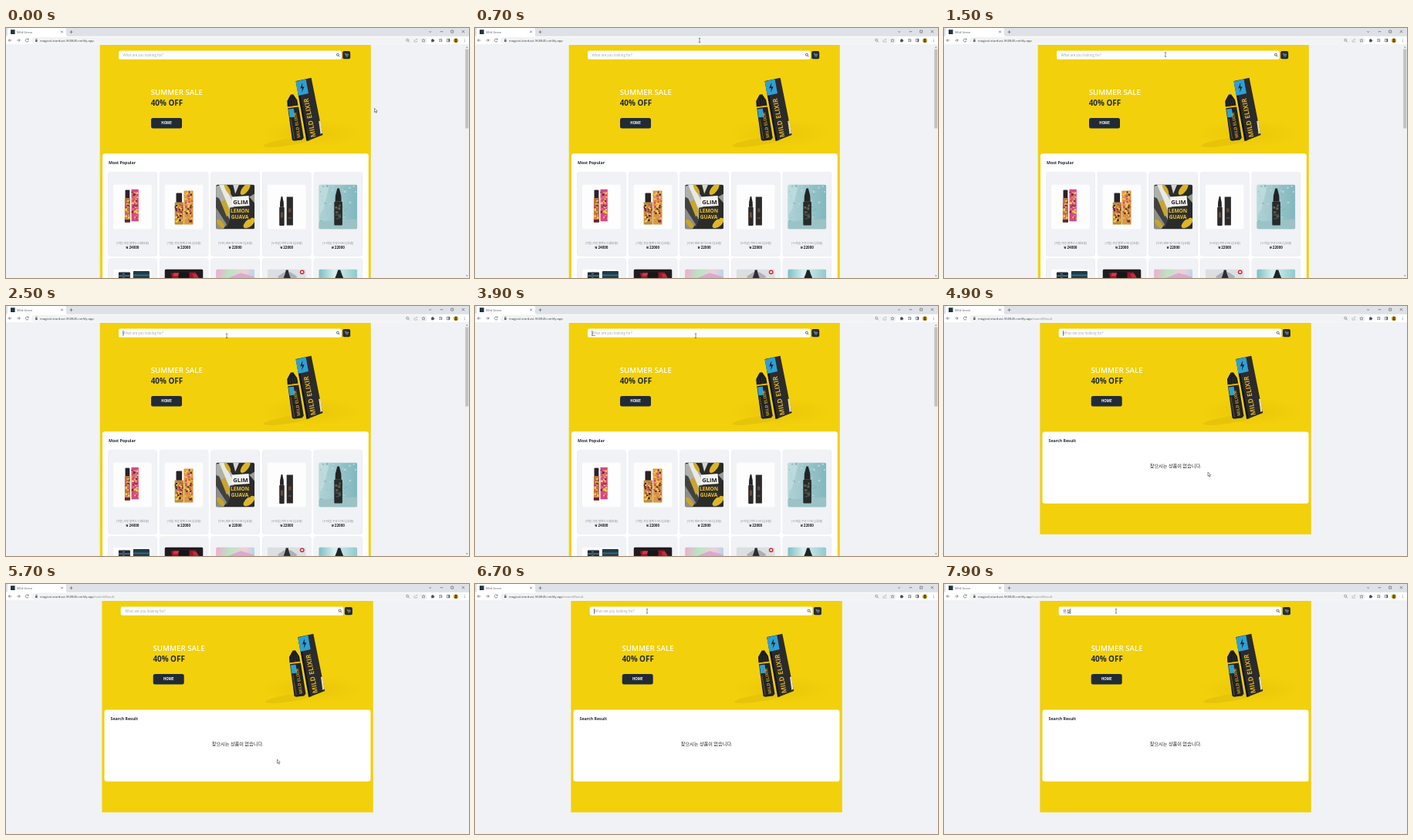
An HTML page for the animation above (8000 ms loop, 600 px wide and 325 px high).

```html
<!DOCTYPE html>
<html lang="en">
<head>
<meta charset="utf-8">
<title>Shop search</title>
<style>
html, body { margin: 0; width: 100%; height: 100%; overflow: hidden; background: #f0f2f5; }
svg { display: block; }
#stage { width: 600px; height: 325px; }
text { font-family: 'Open Sans', 'Noto Sans CJK KR', 'Noto Sans', sans-serif; white-space: pre; }
.ko { font-family: 'Noto Sans CJK KR', 'Noto Sans CJK', sans-serif; }
.line { fill: none; stroke: #55595e; stroke-width: .65; }
</style>
</head>
<body>
<svg id="stage" viewBox="0 0 600 325"></svg>
<script>
const YELLOW = '#f2d00b', DARK = '#212b36', GREY = '#f0f2f5', BLACK = '#1d1e22';
const LOOP = 8000, STEP = 100, SWITCH = 4000;

const rect = (x, y, w, h, fill, r = 0) =>
  `<rect x="${x}" y="${y}" width="${w}" height="${h}" rx="${r}" fill="${fill}"/>`;
const poly = (points, fill) => `<polygon points="${points}" fill="${fill}"/>`;
const dot = (x, y, r, fill) => `<circle cx="${x}" cy="${y}" r="${r}" fill="${fill}"/>`;
const oval = (x, y, rx, ry, turn, fill) =>
  `<ellipse cx="${x}" cy="${y}" rx="${rx}" ry="${ry}" transform="rotate(${turn} ${x} ${y})" fill="${fill}"/>`;
const line = (d, extra = '') => `<path class="line" d="${d}" ${extra}/>`;
const text = (x, y, size, str, fill = DARK, extra = '') =>
  `<text x="${x}" y="${y}" font-size="${size}" fill="${fill}" ${extra}>${str}</text>`;
const group = (x, y, body, extra = '') => `<g transform="translate(${x} ${y})" ${extra}>${body}</g>`;
const turned = (x, y, angle, body) => `<g transform="translate(${x} ${y}) rotate(${angle})">${body}</g>`;
const BOLD = 'font-weight="700"', MID = 'text-anchor="middle"';

let seed = 7;
const random = () => (seed = seed * 16807 % 2147483647) / 2147483647;

function speckle(x, y, w, h, colors, count) {
  let out = '';
  for (let i = 0; i < count; i++) {
    const size = 1 + random() * 1.8;
    out += rect((x + random() * (w - size)).toFixed(1), (y + random() * (h - size)).toFixed(1),
      size.toFixed(1), size.toFixed(1), colors[i % colors.length], .5);
  }
  return out;
}

// Browser window
function magnifier(x, y, color) {
  return line(`M${x + .8} ${y + .8}l1.6 1.6`, `style="stroke:${color}"`) +
    `<circle class="line" cx="${x - .3}" cy="${y - .3}" r="1.5" style="stroke:${color}"/>`;
}

function browser() {
  return rect(0, 0, 600, 11, '#dee1e6') +
    '<path d="M0 11Q2 11 2 9V2Q2 0 4 0H76Q78 0 78 2V9Q78 11 80 11Z" fill="#fff"/>' +
    rect(0, 10.8, 600, 11.2, '#fff') + rect(0, 21.6, 600, .4, '#dfe1e5') +
    rect(6, 2.2, 5.6, 5.8, '#23343c') +
    text(14, 6.8, 4, 'Mild Grove', '#5a5e63') +
    line('M71.2 3.7l2.6 2.6m0-2.6l-2.6 2.6M84.5 3.2v4M82.5 5.2h4') +
    line('M548.2 4.2l1.5 1.4 1.5-1.4M562.7 4.7h3.6M576.7 3.1h3v3h-3zM590.8 2.9l3.4 3.4m0-3.4l-3.4 3.4') +
    line('M7.3 16H3.3m1.9-1.9l-1.9 1.9 1.9 1.9M14.3 16h4m-1.9-1.9l1.9 1.9-1.9 1.9M29 14.9a2 2 0 1 0 .2 1.8M29.2 13.6v1.5h-1.5') +
    rect(33, 11.8, 513, 9, '#f1f3f4', 4.5) +
    rect(38, 15.5, 2.7, 2.4, '#5f6368', .4) + line('M38.6 15.5v-.6a.8.8 0 0 1 1.6 0v.6') +
    magnifier(520.5, 16, '#6f7378') +
    line('M529 15.3v2.8h3.6v-1.4M530.2 16.4q.3-1.8 2.6-1.8m-.8-.8l.8.8-.8.8', 'opacity=".45"') +
    line('M541 14l.7 1.4 1.5.2-1.1 1 .3 1.6-1.4-.8-1.4.8.3-1.6-1.1-1 1.5-.2z', 'opacity=".8"') +
    rect(551.2, 14.8, 3.2, 3.4, '#4b4f54', .5) + dot(552.9, 14.6, .7, '#4b4f54') + dot(554.6, 16.5, .7, '#4b4f54') +
    line('M561.2 14.6h3.6M561.2 16h2.3M561.2 17.4h1.8M564.8 14.6v2.6') + dot(564.3, 17.2, .7, '#4b4f54') +
    line('M571.4 14.3h3.5v3.5h-3.5z') + rect(573.4, 14.3, 1.6, 3.5, '#4b4f54') +
    dot(583, 16.2, 3, '#c99a1c') + dot(583, 15.2, 1.2, '#4d3820') + rect(581.4, 16.6, 3.2, 1.9, '#4d3820', .9) +
    [14.6, 16.2, 17.8].map(y => dot(594.3, y, .45, '#4b4f54')).join('');
}

// Top banner, shared by both pages
function hero() {
  const label = (size, color) => text(0, 0, size, 'MILD ELIXIR', color, BOLD);
  const box = poly('375.5,69 379,68.4 393.5,146 389.5,147', '#121316') +
    poly('378,68.6 395.6,64.8 410.5,139 392,146.3', '#2b2b2c') +
    poly('375.5,69.4 388.6,66.4 392,85 378.8,88', '#2f9fd4') +
    poly('384.3,71 381.2,78.6 384,78 383.2,84 386.6,76 384,76.6', '#15212b') +
    poly('405.3,121 407.3,120.4 410,136.5 407.6,138', '#e7dcb0') +
    turned(401.4, 141.6, -100.8, label(8.7, '#dcae22'));
  const bottle = poly('364.8,102.5 364.3,95 367.6,88.8 369,86.6 372.3,86.2 373.6,88.2 377.2,93.6 378.6,101', '#1c1d20') +
    line('M367.6 93l1.2 8.5M371 92l1.3 9M374.2 92.4l1.2 8', 'style="stroke:#3b3c3e;stroke-width:.6"') +
    poly('365,102.4 378.8,100.6 379.2,102.8 365.3,104.4', '#e5b313') +
    poly('365.3,104.2 379.2,102.6 385.8,142.8 383.5,145.6 373,146.8 370.8,145.4', '#222326') +
    poly('366,105.6 372.8,104.8 374.6,115.6 367.6,116.6', '#2f9fd4') +
    turned(381.6, 142.4, -99.5, label(5.6, '#c99c22')) +
    '<path d="M373.6 144l-4.6-26" stroke="#9a7b24" stroke-width=".9" stroke-dasharray="1.2 .7"/>';
  return oval(395, 137, 66, 18, 0, 'url(#glow)') + oval(367, 148, 34, 4.5, -9, '#e6c40a') + box + bottle +
    rect(146, 29.5, 288.6, 11.3, '#fff', 2) + magnifier(430.2, 35, '#222') +
    rect(436.2, 30, 10, 10.3, DARK, 2) +
    line('M439 33.3h.9l.7 2.7h2.4l.5-1.9h-3.3', 'style="stroke:#e8eaec;stroke-width:.5"') +
    dot(441, 37.2, .4, '#e8eaec') + dot(442.7, 37.2, .4, '#e8eaec') +
    text(187.7, 87.4, 9.75, 'SUMMER SALE', '#fffdf0', 'font-weight="600"') +
    text(187.7, 100.7, 9.9, '40% OFF', DARK, BOLD) +
    rect(188, 117, 40, 13.4, DARK, 2.5) +
    text(208, 125.4, 4.4, 'HOME', '#fff', `${BOLD} ${MID}`);
}

// Product pictures, each 50 by 58
const paper = rect(0, 0, 50, 58, '#fdfdfd');
const funky = ['#efcf45', '#d8457f', '#efcf45', '#6b2b40', '#dd8540'];
const dropper = (x, y, w, h, fill) => {
  const cx = x + w / 2, neck = y + h * .36;
  return poly(`${cx - w * .12},${y} ${cx + w * .12},${y} ${x + w * .85},${y + h * .2} ` +
    `${x + w * .88},${neck} ${x + w * .12},${neck} ${x + w * .15},${y + h * .2}`, '#232224') +
    rect(x, neck, w, y + h - neck, fill, 1);
};
const pictures = [
  paper + rect(15.6, 7, 5.8, 12, '#28222a', 1) + rect(15, 17.5, 7, 32, '#b9743f', .8) +
    speckle(15, 19, 7, 28, funky, 40) + rect(15, 45.5, 7, 3.5, '#5a2834') +
    rect(23.6, 6.2, 9.3, 41.6, '#d8478a') + speckle(23.6, 9, 9.3, 36, funky, 60),
  paper + rect(15, 11, 7.6, 13, '#28232a', 1) + rect(13.2, 23, 11.2, 29, '#bd8a3a', .8) +
    speckle(13.2, 25, 11.2, 26, [...funky, '#39252d'], 65) +
    rect(25, 8, 12, 44, '#d69a45') + speckle(25, 8.5, 12, 43, funky, 85),
  rect(0, 0, 50, 58, '#2a2b2b') + poly('0,2 12,0 25,22 17,47 0,20', '#aeb0aa') +
    poly('4,0 10,0 23,25 18,33', '#e9e9e4') + poly('0,16 4,18 18,46 14,56 0,34', '#414240') +
    poly('0,30 14,52 9,58 0,58', '#8d8e88') + poly('6,22 12,20 18,36 14,42', '#c9a52b') +
    poly('22,0 30,0 25,12', '#d5d6d0') + poly('50,12 50,24 43,16', '#9b9c94') +
    oval(38, 6, 4, 9, 38, '#dcb526') + oval(15, 6, 2.5, 7, -30, '#d2ab23') +
    oval(43, 50, 9, 4.5, -40, '#ddb629') + oval(6, 51, 7, 3, 50, '#c9a427') +
    poly('20.5,16 42.5,14.5 43.5,27.5 21,29', '#f4f4f1') + poly('18,30 43,28.5 45,45 18,46', '#33312a') +
    text(31.8, 25.2, 7.6, 'GLIM', '#202123', `${BOLD} ${MID}`) +
    text(31, 36.6, 6.6, 'LEMON', '#e9c338', `${BOLD} ${MID}`) +
    text(31, 44.2, 6.6, 'GUAVA', '#e9c338', `${BOLD} ${MID}`),
  paper + dropper(15.5, 15.5, 6.5, 38, '#2c292a') + rect(25, 16, 8.2, 37, '#2d2a2b') +
    rect(17.5, 36, 2.6, 7, '#6a5140') + rect(27.4, 31, 3.3, 5, '#5f4a3d') + rect(27, 43, 4.2, 1, '#7b604b'),
  rect(0, 0, 50, 58, 'url(#water)') + poly('0,0 14,0 6,32 0,40', '#bddadc') +
    speckle(0, 0, 50, 58, ['#a5cdd0', '#86b8be', '#b4d6d8'], 70) +
    poly('0,48 50,45 50,58 0,58', '#9bc3c6') + dropper(20, 5, 10.6, 48, '#272a2b') +
    speckle(21, 26, 8.6, 22, ['#6f6148', '#3e4748'], 22),
  paper + rect(7, 4, 15, 54, '#1b2b36', 1) + rect(26, 2.5, 21, 56, '#1f3b4a', 1) +
    rect(7, 8, 15, 1.5, '#4b7c8d') + rect(26, 7, 21, 2, '#38697c') + rect(12, 4, 3, 54, '#3f5562'),
  rect(0, 0, 50, 58, '#1f1b1e') + poly('8,5 40,4 46,14 11,14', '#96182a') + rect(18, 4, 14, 12, '#161519', 1) +
    poly('12,5 19,5 17,9 11,9', '#d9364a') + poly('36,6 41,6 44,11 38,11', '#c62b40'),
  rect(0, 0, 50, 58, 'url(#pastel)') + poly('14,12 32,5 50,10 50,14 14,14', '#dba9cf'),
  rect(0, 0, 50, 58, '#dcdfe1') + poly('14,14 14,9 22,4 30,4 38,9 38,14', '#aab2b7') +
    poly('20,14 23,6 24,1 27,1 28,6 31,14', '#2b2e31') +
    dot(45, 3.8, 2.9, '#cc2a37') + dot(45, 3.8, 1.4, '#eee'),
  rect(0, 0, 50, 58, 'url(#mist)') + poly('20,14 23,7 25,1 28,1 30,7 33,14', '#1d2326')
];
const products = [
  ['[가람] 과일 블랙 0.3 (폐호흡)', 24000], ['[가람] 과일 블랙 0.98 (입호흡)', 22000],
  ['[다온] 레몬 향기 0.98 (입호흡)', 22000], ['[누리담] 커피 0.98 (입호흡)', 22000],
  ['[누리담] 우유 0.98 (입호흡)', 22000]
];

function card(picture, i) {
  const col = i % 5, y = i < 5 ? 186.7 : 299.3;
  const body = rect(-.2, .5, 63.4, 109.3, '#dfe2e6', 3) + rect(0, 0, 63, 109.2, GREY, 3) +
    group(6.4, i < 5 ? 16.8 : 14.2, picture, 'clip-path="url(#photo)"');
  const info = i < 5 ? text(31.5, 94.3, 3.55, products[i][0], '#85898e', `class="ko" ${MID}`) +
    text(31.5, 100.6, 4.55, '₩ ' + products[i][1], BLACK, `${BOLD} ${MID}`) : '';
  return group(132.5 + col * 66.6, y, body + info);
}

const home = rect(121.7, 22, 351.1, 303, YELLOW) + hero() +
  rect(125, 163.2, 344.8, 170, '#fff', 3) +
  text(133, 177, 5.27, 'Most Popular', DARK, BOLD) + pictures.map(card).join('') +
  rect(594.6, 22, 5.4, 303, '#f1f1f1') + rect(595.3, 27.5, 4, 103, '#c1c1c1') +
  poly('596,25.5 598.6,25.5 597.3,24', '#777') + poly('596,321.5 598.6,321.5 597.3,323', '#777');

const result = rect(124.4, 22, 351.4, 274.8, YELLOW) + group(2.7, 0, hero()) +
  rect(127.5, 163.4, 345, 93.4, '#fff', 3) +
  text(135.5, 177, 5.25, 'Search Result', DARK, BOLD) +
  text(300.3, 210.3, 6.2, '찾으시는 상품이 없습니다.', BLACK, `class="ko" font-weight="500" ${MID}`);

const stage = document.getElementById('stage');
stage.innerHTML = `<defs>
  <clipPath id="photo"><rect width="50" height="58" rx="2.5"/></clipPath>
  <radialGradient id="glow"><stop stop-color="#e9c709"/><stop offset="1" stop-color="${YELLOW}"/></radialGradient>
  <linearGradient id="water"><stop stop-color="#b0d3d6"/><stop offset="1" stop-color="#82b7be"/></linearGradient>
  <linearGradient id="mist"><stop stop-color="#79bfc3"/><stop offset=".4" stop-color="#d9eeee"/>
    <stop offset="1" stop-color="#8fcacd"/></linearGradient>
  <linearGradient id="pastel" y2=".3"><stop stop-color="#f3a9cf"/><stop offset=".35" stop-color="#b9e6c2"/>
    <stop offset=".7" stop-color="#f2cdd9"/><stop offset="1" stop-color="#a8d9ee"/></linearGradient></defs>
  ${rect(0, 0, 600, 325, GREY)}<g id="home">${home}</g><g id="result">${result}</g>${browser()}
  <text x="44" y="17.9" font-size="4.22" fill="#3c4043">magical-stardust-960845.netlify.app<tspan
    id="path" fill="#85898e">/searchResult</tspan></text>
  <g id="field">${text(0, 36.9, 4.4, 'What are you looking for?', '#a0a4a8', 'id="hint"')}
    ${text(0, 37.1, 5, '', BLACK, 'id="typed" class="ko"')}
    <path id="compose" d="M0 38.4h4.5" stroke="#333" stroke-width=".5"/>
    <path id="caret" d="M0 32v6.8" stroke="#111" stroke-width=".6"/></g>
  <path id="arrow" d="M0 0V5.2L1.2 4.1 2 6.1 2.9 5.7 2.1 3.8H3.7Z" fill="#fff" stroke="#222" stroke-width=".5"/>
  <path id="beam" d="M-1.2-2.7H1.2M0-2.7V2.7M-1.2 2.7H1.2" fill="none" stroke="#333" stroke-width=".55"/>`;

const part = id => document.getElementById(id);
const show = (id, on) => part(id).setAttribute('visibility', on ? 'visible' : 'hidden');
const move = (id, x, y) => part(id).setAttribute('transform', `translate(${x} ${y})`);

// Timelines: [time, value...]
const pointer = [[0, 477.5, 104.3], [100, 477.5, 104.3], [700, 291, 16], [1000, 291, 17.5], [1700, 286, 38.7],
  [4500, 286, 38.7], [4700, 342, 216], [4900, 342, 216], [5400, 351.5, 228], [5800, 351.5, 228],
  [6300, 223, 35.3], [LOOP, 223, 35.3]];
const typing = [[0, ''], [2900, 'ㅅ'], [3000, '사'], [3200, '삭'], [3300, '사고'], [3500, '사과'], [3800, ''],
  [7300, 'ㅍ'], [7400, '프'], [7500, '프ㅅ'], [7600, '프시'], [7900, '프실']];
const blink = [[0, false], [2100, true], [2600, false], [2900, true], [4400, false], [4700, true],
  [5100, false], [6400, true], [7000, false], [7300, true]];

const valueAt = (track, t) => track.filter(k => k[0] <= t).pop()[1];

function pointerAt(t) {
  const i = pointer.findIndex(k => k[0] > t);
  const [t0, x0, y0] = pointer[i - 1], [t1, x1, y1] = pointer[i];
  const p = (t - t0) / (t1 - t0), e = p * p * (3 - 2 * p);
  return [x0 + (x1 - x0) * e, y0 + (y1 - y0) * e];
}

function draw(time) {
  const t = Math.floor(time % LOOP / STEP) * STEP;
  const searched = t >= SWITCH, typed = valueAt(typing, t), [x, y] = pointerAt(t);
  show('home', !searched);
  show('result', searched);
  show('path', searched);
  move('field', searched ? 154.3 : 151.6, 0);
  part('typed').textContent = typed;
  show('hint', !typed);
  show('compose', t >= 3800 && t < SWITCH);
  show('caret', valueAt(blink, t));
  move('caret', typed.length * 4.6 + .3, 0);
  const overText = y < 21 || (y > 29.5 && y < 41);
  show('arrow', !overText);
  show('beam', overText);
  move(overText ? 'beam' : 'arrow', x, y);
}

const start = performance.now();
function tick() {
  draw(performance.now() - start);
  requestAnimationFrame(tick);
}
tick();
</script>
</body>
</html>
```
